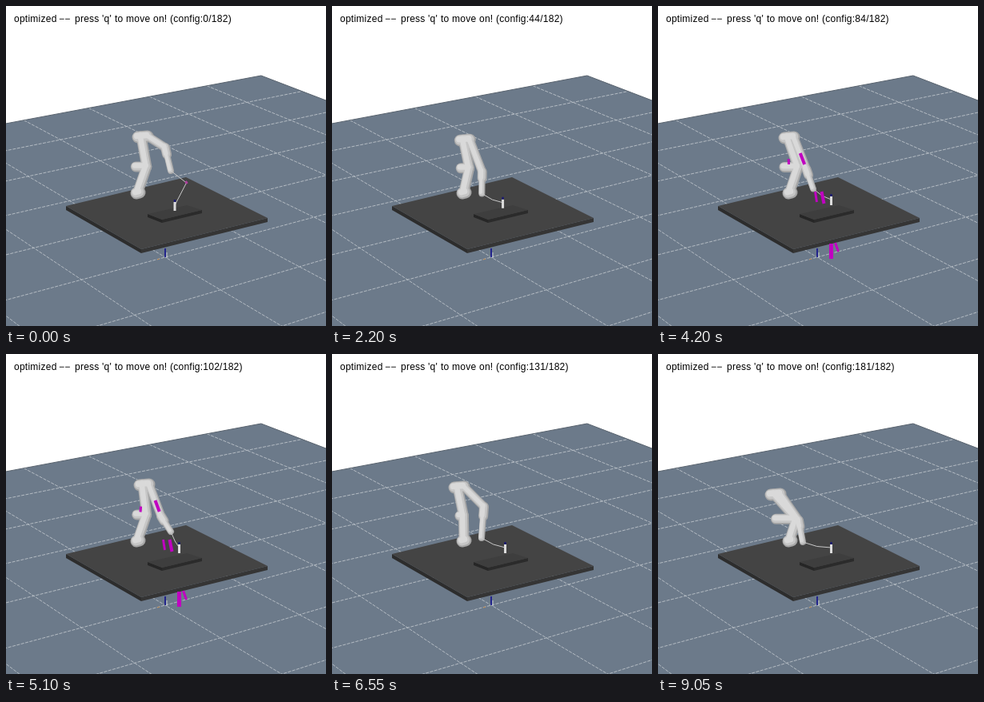
An HTML page with a canvas that plays this animation: 400 by 400 pixels, repeating every 9100 ms.

```html
<!DOCTYPE html>
<html lang="en">
<head>
<meta charset="utf-8">
<title>Robot arm configurations</title>
<style>
  html, body { margin: 0; width: 100%; height: 100%; overflow: hidden; background: #fff; }
  canvas, svg { position: absolute; left: 0; top: 0; width: 400px; height: 400px; }
  text { font: 12px "Liberation Sans", Arial, sans-serif; letter-spacing: .25px; fill: #000; }
</style>
</head>
<body>
<canvas id="scene" width="400" height="400"></canvas>
<svg viewBox="0 0 400 400">
  <text y="20"><tspan x="10">optimized</tspan> <tspan x="66">−−</tspan> <tspan x="86">press</tspan> <tspan x="120">'q'</tspan> <tspan x="136">to</tspan> <tspan x="150">move</tspan> <tspan x="184">on!</tspan> <tspan x="205" id="config">(config:0/182)</tspan></text>
</svg>
<script>
const ctx = document.getElementById('scene').getContext('2d');
const config = document.getElementById('config');
const STEP = 50, COUNT = 182;
const BASE = [165, 232];

// The arm is posed by its elbow, wrist and fingertip; bend pushes the shoulder sideways.
const poses = [
  { t: 0,    elbow: [169, 163], wrist: [199, 177], tip: [206, 206], bend: 9 },
  { t: 1250, elbow: [174, 169], wrist: [197, 209], tip: [192, 234], bend: 0 },
  { t: 3300, elbow: [153, 165], wrist: [177, 205], tip: [182, 235], bend: 15 },
  { t: 5100, elbow: [171, 163], wrist: [194, 203], tip: [206, 222], bend: 8 },
  { t: 6550, elbow: [157, 166], wrist: [190, 191], tip: [187, 230], bend: 3 },
  { t: 7600, elbow: [172, 164], wrist: [194, 204], tip: [204, 228], bend: 5 },
  { t: 9050, elbow: [145, 175], wrist: [176, 208], tip: [181, 235], bend: 17 }
];

const mix = (a, b, k) => a + (b - a) * k;
const between = (p, q, k) => p.map((v, i) => mix(v, q[i], k));
const shift = ([x, y], dx, dy = 0) => [x + dx, y + dy];
const clamp = v => Math.min(1, Math.max(0, v));

// Perspective position of a floor point, in metres from the world origin.
function floorPoint(a, b) {
  const p = .03984 * a, q = -.04996 * b, w = 1 + p + q;
  return [(199 + 2719 * p - 1115 * q) / w, (314 - 364 * p - 462 * q) / w];
}

function trace(points) {
  ctx.beginPath();
  points.forEach(([x, y]) => ctx.lineTo(x, y));
}

function polygon(fill, ...points) {
  trace(points);
  ctx.fillStyle = fill;
  ctx.fill();
}

function line(color, width, points, cap = 'butt') {
  trace(points);
  ctx.strokeStyle = color;
  ctx.lineWidth = width;
  ctx.lineCap = cap;
  ctx.lineJoin = 'round';
  ctx.stroke();
}

function slab(left, front, right, back, depth, top, sideL, sideR) {
  const down = p => shift(p, 0, depth);
  polygon(sideL, left, front, down(front), down(left));
  polygon(sideR, front, right, down(right), down(front));
  polygon(top, left, front, right, back);
}

function drawStage() {
  ctx.fillStyle = '#fff';
  ctx.fillRect(0, 0, 400, 400);
  const rim = [floorPoint(-1, -5), floorPoint(5, -5), floorPoint(5, -2)];
  polygon('#6c7a8a', ...rim, [700, 500], [-100, 500]);
  ctx.setLineDash([4, 1.5]);
  for (let i = -4; i < 5; i++) {
    line('#bbc2c9', .9, [floorPoint(i, -5), floorPoint(i, 3)]);
    line('#bbc2c9', .9, [floorPoint(-4, i), floorPoint(5, i)]);
  }
  ctx.setLineDash([]);
  line('#59636e', 1, rim);

  slab([75, 250], [169, 304], [327, 265], [225, 214], 5, '#444', '#2d2d2d', '#353535');
  slab([177, 260], [195, 267], [245, 255], [226, 249], 4, '#3e3e3e', '#262626', '#2b2b2b');

  line('#c08a50', 1, [[189, 317], [192, 316]]);
  line('#c9ced4', 1, [[201, 308], [201, 315]]);
  line('#16168c', 1.7, [[199, 303], [199, 314]]);
}

function drawArm({ elbow, wrist, tip, bend }) {
  const middle = between(BASE, elbow, .45), shoulder = shift(middle, bend);
  const links = [
    [15, shift(BASE, -2, 2), shift(BASE, 2, 1)],
    [13, BASE, shoulder],
    [13, shift(middle, -bend / 2), shoulder],
    [13, shoulder, elbow],
    [15, shift(elbow, -4, 1), shift(elbow, 8)],
    [11, shift(elbow, 8), wrist],
    [12, wrist, between(wrist, tip, .3)],
    [8, wrist, tip]
  ];
  const shades = [['#a6a6a6', 1, 0], ['#c6c6c6', .8, -.6], ['#d9d9d9', .5, -1.4]];
  for (const [color, scale, offset] of shades) {
    for (const [width, from, to] of links) {
      line(color, width * scale, [from, to].map(p => shift(p, offset, offset)), 'round');
    }
  }
}

function drawPost([x, y]) {
  line('#dcdcdc', 3, [[x, y + 2], [x, y + 13]]);
  line('#1b1b70', 2.5, [[x, y - 1], [x, y + 2]]);
}

// Colliding parts: along both arm halves, under the hand and below the table.
function drawContacts({ elbow, wrist }, [x]) {
  const bar = (width, from, to) => line('#c000c0', width, [from, to]);
  const upper = shift(elbow, 8);
  bar(4, between(upper, wrist, .5), between(upper, wrist, .85));
  bar(3, between(BASE, elbow, .5), between(BASE, elbow, .6));
  bar(4, [x - 12, 232], [x - 9, 247]);
  bar(3, [x - 20, 232], [x - 18, 245]);
  bar(5, [x, 297], [x, 316]);
  bar(3, [x + 5, 296], [x + 9, 307]);
}

function poseAt(now) {
  const next = Math.max(1, poses.findIndex(p => p.t >= now));
  const a = poses[next - 1], b = poses[next], k = (now - a.t) / (b.t - a.t);
  const joint = name => between(a[name], b[name], k);
  return { elbow: joint('elbow'), wrist: joint('wrist'), tip: joint('tip'), bend: mix(a.bend, b.bend, k) };
}

function draw(time) {
  const index = Math.floor(time / STEP) % COUNT, now = index * STEP;
  const pose = poseAt(now), { tip } = pose;
  const post = between([211, 243], [216.5, 236], clamp((now - 1250) / 2050));
  const slack = 17 * clamp(1 - now / 600);
  const target = shift(post, 0, 6);
  const knot = shift(between(tip, target, .5), slack, 2 - slack / 2);

  drawStage();
  drawArm(pose);
  line('#c8c8c8', 1, [tip, knot, target]);
  if (slack) line('#b040a0', 3, [shift(knot, -1, -2), shift(knot, 1, 1)]);
  drawPost(post);
  const touching = tip[0] > 190 && tip[1] > 215;
  if (touching) drawContacts(pose, post);
  config.textContent = `(config:${index}/${COUNT})`;
}

const start = performance.now();
function tick() {
  draw(performance.now() - start);
  requestAnimationFrame(tick);
}
tick();
</script>
</body>
</html>
```
